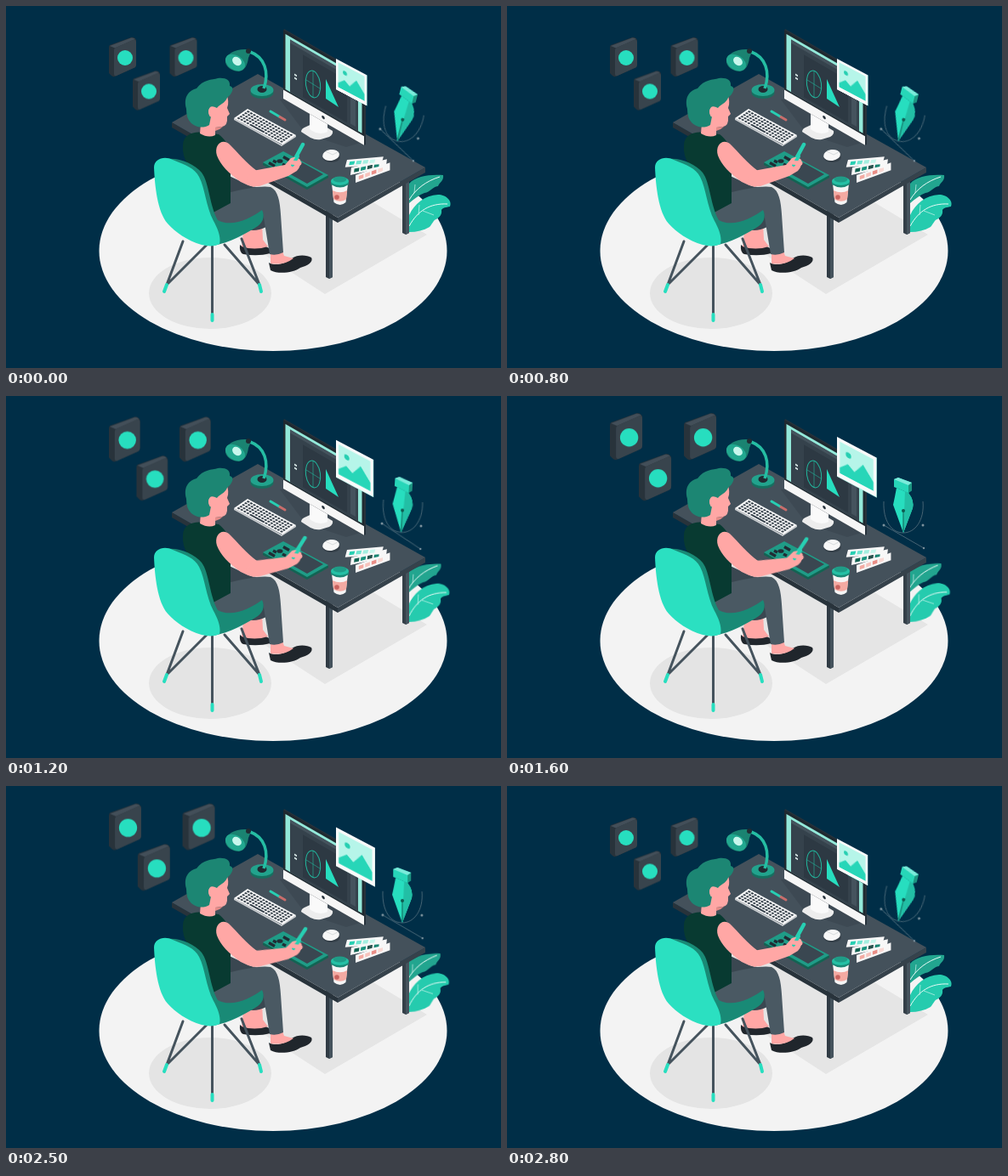
Recreate the animation shown at these times as an HTML page. Size 582 by 426 pixels, loop 2.9 s.

```html
<!DOCTYPE html>
<html lang="en">
<head>
<meta charset="utf-8">
<title>Designer at a desk</title>
<style>
  html, body { margin: 0; width: 100%; height: 100%; overflow: hidden; background: #002e47; }
  svg { display: block; width: 582px; height: 426px; }
  .round { stroke-linecap: round; stroke-linejoin: round; }
</style>
</head>
<body>
<svg viewBox="0 0 582 426">
  <defs>
    <g id="block">
      <path d="M1-37 26-46Q30-47 32-43V-14Q32-11 29-10L8-.5Q5 1 3-1L0-4V-34Q0-36 1-37Z" fill="#28333b"/>
      <path d="M1-36 26-45.500Q29-46 31-44L7-33.500Z" fill="#434f59"/>
      <path d="M6-31Q6-33 8-34L29-43.500Q32-44 32-41V-14Q32-11 29-10L9-1Q6 0 6-3Z" fill="#38444d"/>
      <circle cx="19" cy="-22" r="9" fill="#27debf"/>
    </g>
  </defs>

  <!-- floor -->
  <ellipse cx="314" cy="288" rx="204.500" ry="118" fill="#f3f3f3"/>
  <path d="M200 225 375 339 495 269 330 170Z" fill="#e5e5e5"/>
  <ellipse cx="240" cy="338" rx="72" ry="42" fill="#e4e4e4"/>

  <!-- plant -->
  <g id="plant">
    <path d="M474 232V209C482 200 498 198 514 199C515 206 510 207 508 212C501 213 499 219 492 220C486 222 480 227 474 232Z" fill="#22a58f"/>
    <path d="M474 266V246C480 233 492 223 508 222C517 222 525 229 522 236C517 237 514 237 512 240C513 247 508 249 506 251C503 251 501 257 498 260C491 264 483 266 474 266Z" fill="#25cbae"/>
    <g fill="none" stroke="#e8fbf7" stroke-width="1">
      <path d="M474 228C482 215 494 206 510 201"/>
      <path d="M474 259C484 241 498 232 519 233"/>
      <path d="M485 246 486 234M490 241 503 246M480 220 481 210" stroke-width=".6"/>
    </g>
  </g>

  <!-- desk -->
  <path d="M466 205H474V267L470 269 466 267Z" fill="#343f48"/>
  <path d="M470 205H474V267L470 269Z" fill="#45535d"/>
  <path d="M376 240H384V319L380 321 376 319Z" fill="#303b44"/>
  <path d="M380 240H384V319L380 321Z" fill="#45535d"/>
  <path d="M195 137 390 249 390 255 195 143Z" fill="#28333b"/>
  <path d="M390 249 493 190V196L390 255Z" fill="#36424b"/>
  <path d="M195 137 296 80 493 190 390 249Z" fill="#44515b"/>
  <path d="M322 110 345 108 420 160 400 166 352 150Z" fill="#3d4953"/>

  <!-- lamp -->
  <ellipse cx="301" cy="102" rx="13.500" ry="7" fill="#167060"/>
  <ellipse cx="301" cy="99" rx="13.500" ry="7" fill="#22a38d"/>
  <ellipse cx="301" cy="98" rx="5.500" ry="4" fill="#202a32"/>
  <path d="M303 97C310 78 304 60 287 54" fill="none" stroke="#25bda3" stroke-width="3.500"/>
  <path d="M258 64C259 56 270 50 284 51C289 53 287 57 285 61C284 69 281 76 274 77C266 77 257 71 258 64Z" fill="#1a8371"/>
  <ellipse cx="269.500" cy="66.500" rx="12.500" ry="8.500" transform="rotate(32 269.5 66.500)" fill="#22a890"/>
  <ellipse cx="271.500" cy="65" rx="6" ry="4.500" transform="rotate(40 271.5 65)" fill="#c7f7ed"/>
  <circle cx="285" cy="53" r="3" fill="#202a32"/>

  <!-- monitor -->
  <path d="M347 148Q347 144 353 142L366 136 384 147Q385 151 380 154L370 157Q364 158 358 155Z" fill="#ededed"/>
  <path d="M357 126 378 138V148Q368 153 357 145Z" fill="#fafafa"/>
  <g transform="matrix(1 .577 0 1 326 28)">
    <path d="M0 0 1.500-1.500 97-1.500V79L95 81Z" fill="#27323b"/>
    <rect width="95" height="81" rx="1.500" fill="#1f2930"/>
    <rect x="2.500" y="3.500" width="90" height="65" fill="#93e8d9"/>
    <rect x="8" y="7" width="80" height="62" fill="#35424c"/>
    <rect x="8" y="7" width="80" height="4" fill="#45535d"/>
    <rect x="23" y="16" width="52" height="50" fill="#2d3943"/>
    <rect x="79" y="15" width="6" height="50" fill="#45535d"/>
    <path d="M13 45H16M13 49H16" stroke="#d6e5e4" stroke-width="2"/>
    <rect y="70.500" width="95" height="10.500" fill="#f6f6f6"/>
    <circle cx="47" cy="76" r="1.800" fill="#26313a"/>
  </g>
  <g fill="none" stroke="#22b69d" stroke-width="1">
    <ellipse cx="361" cy="92" rx="8.500" ry="16" transform="rotate(-8 361 92)"/>
    <path d="M361 76V108M353 87 369 97" stroke-width=".6"/>
  </g>
  <path d="M376 86V109L391 119Z" fill="#27debf"/>
  <g id="card">
    <g transform="matrix(1 .53 0 1 0 0)">
      <rect width="36" height="36" fill="#fafafa"/>
      <rect x="2.500" y="3" width="31" height="29" fill="#b6f5e9"/>
      <circle cx="10.500" cy="11.500" r="2.500" fill="#27cfb2"/>
      <path d="M2.500 32V27L10 20 16 24 24 13 33.500 24V32Z" fill="#27d6b8"/>
    </g>
  </g>

  <!-- desk items -->
  <path d="M268 132 324 163 341 152V154L324 165 268 134Z" fill="#c9cccf"/>
  <g transform="matrix(1 .544 -1 .69 284 121)">
    <rect width="57" height="16" fill="#fafafa"/>
    <g id="keys" fill="#36414b"></g>
  </g>
  <g class="round" stroke-width="3">
    <path d="M311 124 322 130.500" stroke="#27cfb2"/>
    <path d="M322 130.500 328 134" stroke="#c96d6b"/>
  </g>
  <ellipse cx="382.500" cy="178" rx="10.500" ry="6" fill="#343f48"/>
  <ellipse cx="382" cy="175.500" rx="10" ry="6.500" transform="rotate(-8 382 175.5)" fill="#f7f7f7"/>
  <path d="M376 171 384 175 390 172" fill="none" stroke="#cfd3d5" stroke-width=".8"/>
  <path d="M302 185 326 172 379 200V202L354 216 302 187Z" fill="#126453"/>
  <path d="M302 184 326 171 379 199 354 213Z" fill="#1f9c87"/>
  <path d="M329 195 348 184 373 198 354 209Z" fill="#3a4751"/>
  <path d="M309 184.500 316 188.500M314 182 318 184M325 186 329 188M326 177.500 333 181.500" stroke="#202d35" stroke-width="3.500"/>
  <ellipse cx="322" cy="182.500" rx="3.500" ry="2.300" fill="#202d35"/>
  <g id="swatches"></g>
  <path d="M383 209H402L399.500 231Q393 237 385.500 231Z" fill="#f5f5f5"/>
  <path d="M383.800 217Q393 221.500 401.200 217L400 227.500Q393 232 385 227.500Z" fill="#f4aaa2"/>
  <circle cx="389" cy="225" r="2.800" fill="#c9635f"/>
  <path d="M382 206H403V210Q393 217 382 210Z" fill="#1a8876"/>
  <ellipse cx="392.500" cy="206" rx="10.500" ry="5" fill="#25c0a5"/>
  <ellipse cx="392.500" cy="204" rx="8" ry="3.500" fill="#1f9c87"/>

  <!-- seated figure -->
  <path d="M275 281C280 286 292 284 302 281L311 286V291Q296 295 279 292 274 290 275 281Z" fill="#20262c"/>
  <path d="M280 258 301 255 302 275 308 283Q292 288 277 283Z" fill="#ffa7a5"/>
  <path d="M276 248 304 240 306 260Q292 267 281 262Z" fill="#3a4751"/>
  <path d="M254 196 288 212 312 216 262 226Z" fill="#3a4751"/>
  <path d="M309 302C316 306 328 304 336 297C343 292 354 293 359 296C362 301 354 306 346 308C338 314 320 316 311 311Z" fill="#20262c"/>
  <path d="M311 289 325 288 327 294 338 297Q326 306 311 303Z" fill="#ffa7a5"/>
  <path d="M234 240 260 220C282 215 300 211 311 213C320 217 322 230 323 245L326 290Q318 294 310 292L302 243C286 250 270 262 250 270Z" fill="#4a5963"/>
  <path d="M208 164C208 151 221 147 232 149L250 151C262 160 268 176 264 195V232L240 245C231 228 220 200 214 187Q207 176 208 164Z" fill="#083a31"/>
  <path d="M229 138 238 112 259 103Q263 113 260 120L263 127 260 130Q261 141 254 142L246 143V152Q238 156 228 150Z" fill="#ffa7a5"/>
  <path d="M246 143 255 142Q251 146 246 147Z" fill="#e58b88"/>
  <path d="M212 121C208 106 216 99 224 97C232 86 242 87 249 85C258 84 264 87 263 94C270 96 265 104 260 108C258 114 251 116 248 120Q239 115 238 124L241 130 239 140C231 145 222 142 217 137Q212 132 212 121Z" fill="#1c8673"/>
  <ellipse cx="242.500" cy="125" rx="4.500" ry="6" fill="#ffa7a5"/>
  <path d="M248 176C244 163 255 154 264 164C272 172 283 185 295 194L292 213Q283 211 276 207C262 197 252 187 248 176Z" fill="#ffa7a5"/>
  <g id="forearm">
    <path d="M337 185 349 163" class="round" stroke="#27cfb2" stroke-width="4.500"/>
    <path d="M290 194 328 187 335 179Q342 176 346 181 348 187 342 194L332 200 298 212Q283 214 284 203Z" fill="#ffa7a5"/>
    <path d="M337 187 343 177" class="round" stroke="#27cfb2" stroke-width="4"/>
    <path d="M335 184 345 185" class="round" stroke="#ffa7a5" stroke-width="5"/>
  </g>

  <!-- chair -->
  <g fill="none" class="round" stroke-width="3">
    <path d="M208 277 189 328 238 279M257 281 298 328 277 274M242.500 280V364" stroke="#45535d"/>
    <path d="M189 328 186 336M298 328 300 336M242.500 363V370" stroke="#27debf" stroke-width="4"/>
  </g>
  <path d="M190 180C203 178 222 186 230 196C239 208 239 234 249 252C265 261 288 250 301 240C305 248 302 256 293 261C280 269 264 278 244 282Z" fill="#198a76"/>
  <path d="M174 190C174 180 186 176 196 181C211 187 222 191 227 201C234 214 235 236 244 253C249 262 253 272 251 280C246 283 238 283 230 281C213 276 199 266 190 256C178 242 175 212 174 190Z" fill="#2be0c1"/>

  <!-- floating pieces -->
  <use id="tileA" href="#block"/>
  <use id="tileB" href="#block"/>
  <use id="tileC" href="#block"/>
  <g id="nib">
    <path d="M-23-37C-24-14-14 0 0 0S25-15 23-37M-23-9 24 18" fill="none" stroke="#58717f" stroke-width=".8"/>
    <path d="M-8-53 6-47Q13-38 11-29L0 0-12-33Q-10-42-8-53Z" fill="#27debf"/>
    <path d="M2-49 6-47Q13-38 11-29L0 0Z" fill="#22bfa5"/>
    <path d="M0-2V-25" stroke="#0f5a50" stroke-width="1"/>
    <circle cy="-26" r="2" fill="#0f5a50"/>
    <path d="M-11-63-6-65 10-59V-50L6-47-11-54Z" fill="#27d6b8"/>
    <path d="M-11-63-6-65 10-59 6-56Z" fill="#7beada"/>
    <path d="M6-56 10-59V-50L6-47Z" fill="#1c9480"/>
    <g fill="#7d929d">
      <circle cx="-23" cy="-9" r="1.500"/><circle cx="23" cy="-9" r="1.500"/><circle cx="24" cy="18" r="1.200"/>
    </g>
  </g>
</svg>
<script>
  const LOOP = 2900;
  const byId = id => document.getElementById(id);

  function add(parent, tag, attrs) {
    const el = document.createElementNS('http://www.w3.org/2000/svg', tag);
    for (const name in attrs) el.setAttribute(name, attrs[name]);
    parent.append(el);
    return el;
  }

  for (let row = 0; row < 5; row++) {
    for (let col = 0; col < 15; col++) {
      if (row === 4 && col > 3 && col < 9) continue;
      add(byId('keys'), 'rect', { x: 2 + col * 3.6, y: 1.5 + row * 2.8, width: 2.4, height: 1.8 });
    }
  }
  add(byId('keys'), 'rect', { x: 16.4, y: 12.7, width: 17, height: 1.8 });

  // Fanned colour cards: left end, angle, chip colours
  const cards = [
    [411, 199, -20, ['#f4aaa2', '#f7c3bd', '#e98e87', '#f9d8d3']],
    [406, 190, -13, ['#126453', '#1b9480', '#27504c', '#188572']],
    [401, 181, -5, ['#27cfb2', '#70e4d0', '#a4eee0', '#c5f5eb']]
  ];
  for (const [x, y, angle, chips] of cards) {
    const card = add(byId('swatches'), 'g', { transform: `translate(${x} ${y}) rotate(${angle}) skewX(-20)` });
    add(card, 'rect', { width: 43, height: 8.5, fill: '#f7f7f7' });
    chips.forEach((fill, i) => add(card, 'rect', { x: 4 + i * 8, y: 2.3, width: 6, height: 4, fill }));
  }

  // [time in ms, share of the way from rest to raised]
  const steps = [
    [0, 0], [1000, .03], [1100, .26], [1200, .74], [1300, .97], [1400, 1],
    [2500, .97], [2600, .7], [2700, .1], [2800, 0], [LOOP, 0]
  ];

  // Poses are [x, y, degrees, scale]
  function move(id, rest, raised, pivot = [0, 0]) {
    const frames = steps.map(([time, share]) => {
      const [x, y, turn, size] = rest.map((v, i) => v + (raised[i] - v) * share);
      return {
        offset: time / LOOP,
        easing: 'steps(1, end)',
        transform: `translate(${x}px, ${y}px) rotate(${turn}deg) scale(${size}) translate(${-pivot[0]}px, ${-pivot[1]}px)`
      };
    });
    byId(id).animate(frames, { duration: LOOP, iterations: Infinity });
  }

  move('tileA', [121, 83, 0, 1], [121, 75, 0, 1.19]);
  move('tileB', [192.5, 83, 0, 1], [208, 75, 0, 1.19]);
  move('tileC', [149, 122.5, 0, 1], [155, 123, 0, 1.19]);
  move('card', [388, 62, 0, 1], [388, 48, 0, 1.28]);
  move('nib', [460, 159, 14, 1], [466, 161, 0, 1]);
  move('forearm', [289, 202, 0, 1], [289, 202, 5, 1], [289, 202]);
  move('plant', [474, 265, 0, 1], [474, 265, -3, 1], [474, 265]);
</script>
</body>
</html>
```
